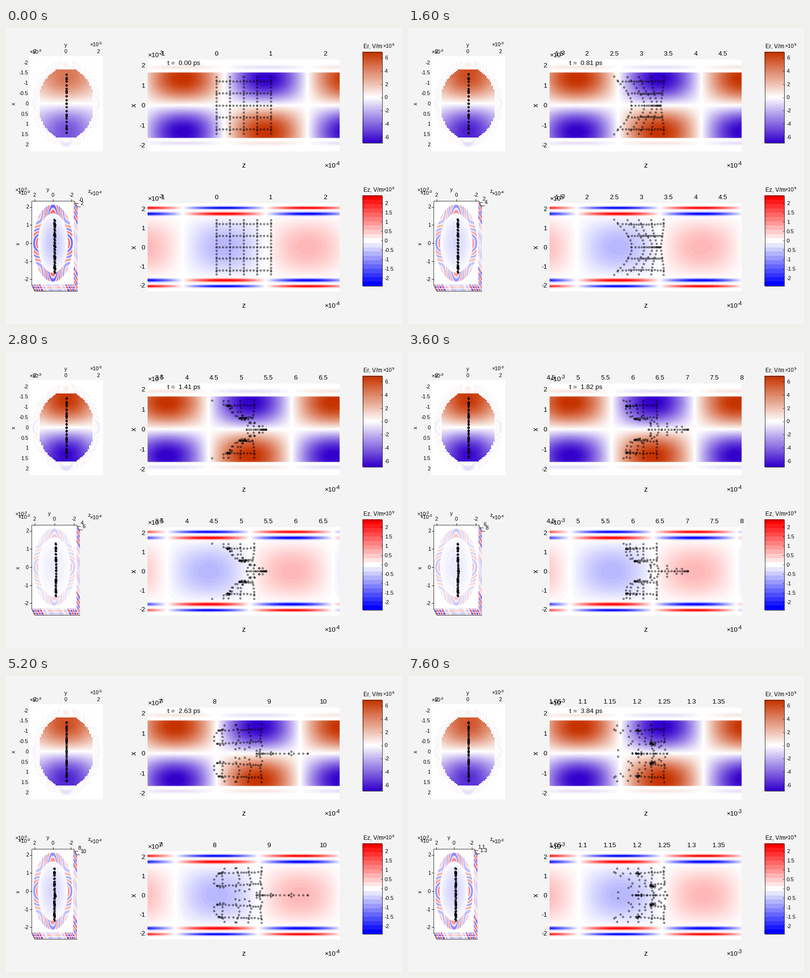
A matplotlib script for the animation above (8000 ms loop, 800 by 600 pixels).

```python
import numpy as np
import matplotlib.pyplot as plt
from matplotlib.animation import FuncAnimation
from matplotlib.colors import LinearSegmentedColormap

FRAMES, INTERVAL = 20, 400
UNIT = 110.1              # pixels per 1e-4 m along z
K = 2 * np.pi / 336       # wave number, 1/px
CREST = 525               # pixel of the field crest at t = 0
SPEED = 66.9              # wave speed, px per frame
LAG = 0.3                 # how much slower the bunch drifts
ACC, GYRO = 5.72, 0.85    # peak acceleration and gyration per frame
LEFT, RIGHT = 286, 674    # z panels
ER_MAX, EZ_MAX = 6.87, 2.41
BIG, SMALL = 13.33, 10.67

plt.rcParams["font.family"] = "Liberation Sans"
er_colors = [(0.2, 0, 0.8), "white", (0.78, 0.2, 0)]
ez_colors = ["blue", "white", "red"]
ER = LinearSegmentedColormap.from_list("er", er_colors, 61)
EZ = LinearSegmentedColormap.from_list("ez", ez_colors, 81)
EZ_BAR = LinearSegmentedColormap.from_list("ez_bar", ez_colors, 21)

fig = plt.figure(figsize=(8, 6), dpi=100, facecolor="#f4f4f4")
ax = fig.add_axes([0, 0, 1, 1])


# ---- particles: electrons in the wave, in the frame moving with it ----

def start_grid():
    col_z, col_x = np.meshgrid(np.linspace(0, 1, 5), np.linspace(-1.43, 1.43, 17))
    row_z, row_x = np.meshgrid(np.linspace(0, 1, 17), np.linspace(-1.2, 1.2, 5))
    z = np.concatenate([col_z.ravel(), row_z.ravel()])
    x = np.concatenate([col_x.ravel(), row_x.ravel()])
    return np.array([424.5 + UNIT * z, x, 0 * z, 0 * z])


def rate(state):
    z, x, uz, ux = state
    phase = K * (z - CREST)
    push = -ACC * np.cos(0.95 * x) * np.sin(phase)
    gyro = -GYRO * np.sin(1.17 * x) * np.cos(phase)
    return np.array([uz - LAG, ux / (10 * UNIT), push - gyro * ux, gyro * uz])


def trace(substeps=12):
    state, h, path = start_grid(), 1 / substeps, []
    for _ in range(FRAMES):
        path.append(state[:2])
        for _ in range(substeps):
            a = rate(state)
            b = rate(state + h / 2 * a)
            c = rate(state + h / 2 * b)
            d = rate(state + h * c)
            state = state + h / 6 * (a + 2 * b + 2 * c + d)
    return path


PATH = trace()


def view_lead(k):
    """Lead of the view over the wave in px (cubic Hermite curve)."""
    t = [0, 4, 7, 11, 13, 16, 19]
    v = [0, 16.4, 32, 22.6, 15, 9.9, 11.9]
    m = [0, 6, 2, -3, -3, -0.5, 1]
    i = min(np.searchsorted(t, k, side="right") - 1, 5)
    h = t[i + 1] - t[i]
    s = (k - t[i]) / h
    return ((1 + 2 * s) * (1 - s) ** 2 * v[i] + s * s * (3 - 2 * s) * v[i + 1]
            + h * s * (1 - s) * ((1 - s) * m[i] - s * m[i + 1]))


# ---- fields ----

def er_profile(x):
    r = np.abs(x)
    edge = np.clip((1.66 - r) / 0.04, 0, 1)
    halo = 0.12 * np.exp(-((r - 1.9) / 0.1) ** 2)
    return -6.9 * np.sign(x) * (np.sin(1.17 * r) * edge + halo)


def wall_rings(r):
    """Two opposite layers of the longitudinal field in the wall."""
    return np.exp(-((r - 1.735) / 0.085) ** 2) - np.exp(-((r - 2.045) / 0.07) ** 2)


def ez_profile(x):
    r = np.abs(x)
    return np.where(r < 1.6, -0.68 * np.cos(0.95 * r), 2.5 * wall_rings(r))


def ripple(x, y):
    """Wall layers that break into slanted fringes off the axes."""
    r, angle = np.hypot(x, y), np.arctan2(y, x)
    skew = np.sin(2 * angle) ** 2
    wave = np.sin(2 * np.pi * (r - 1.6) / 0.6 + 15 * skew)
    return np.where((r > 1.64) & (r < 2.13), wave * (1 - 0.45 * skew), 0)


def er_section(x, y):
    r = np.hypot(x, y) + 1e-9
    ys, xs = np.round(y / 0.1) * 0.1, np.round(x / 0.06) * 0.06
    outline = np.maximum(np.maximum(abs(x), abs(y)), np.hypot(xs, ys) / 1.05)
    inside = -6.9 * np.sin(1.17 * np.minimum(r, 1.5)) * x / r
    cap = -0.8 * np.sign(x) * np.exp(-((r - 1.95) / 0.13) ** 2 - (y / 0.35) ** 2)
    return np.where(outline < 1.65, inside, cap + 0.4 * ripple(x, y) * (r > 1.75))


def ez_section(x, y):
    r = np.hypot(x, y)
    return np.where(r < 1.64, -0.68 * np.cos(0.95 * r), 2 * ripple(x, y))


def side_fringe(u):
    return np.sin(3.6 * u * u + 0.6) * np.where(abs(u) > 1.3, 2.2, 0.7)


# ---- drawing helpers ----

def text(x, y, s, size=SMALL, ha="center", rotation=0):
    """Text whose capitals are centred on y."""
    if rotation:
        ax.text(x, y, s, fontsize=size * 0.72, ha="center", va="center", rotation=rotation)
    else:
        ax.text(x, y + 0.36 * size, s, fontsize=size * 0.72, ha=ha, va="baseline")


def power(x, y, exponent, size=SMALL):
    text(x, y, "×10", size, "left")
    text(x + 1.7 * size, y - 0.32 * size, str(exponent), 0.76 * size, "left")


def line(xs, ys, width=0.8, color="black"):
    ax.plot(xs, ys, color=color, lw=width * 0.72)


def dots(x, y):
    ax.plot(x, y, "o", ms=2.2, mew=0.58, mfc="none", mec="black")


def picture(values, box, cmap, limit):
    left, right, top, bottom = box
    ax.imshow(values, extent=(left, right, bottom, top), cmap=cmap, vmin=-limit,
              vmax=limit, aspect="auto", interpolation="nearest")


def pixels(a, b):
    return np.arange(a, b) + 0.5


def colorbar(top, bottom, cmap, limit, title, ticks, scale, title_y):
    picture(np.linspace(limit, -limit, 183)[:, None], (720, 760, top, bottom), cmap, limit)
    line([720.5, 759.5, 759.5, 720.5, 720.5],
         [top + 0.5, top + 0.5, bottom - 0.5, bottom - 0.5, top + 0.5], 1, "0.2")
    middle = (top + bottom) / 2
    for t in ticks:
        y = middle - scale * t
        line([757, 760], [y, y], 0.6)
        text(765, y, f"{t:g}", 11, "left")
    text(722, title_y, title, 11.6, "left")
    power(761, title_y, 9)


def z_panel(top, bottom, middle, scale, field, cmap, limit, ticks, origin, exponent):
    x = (middle - pixels(top, bottom)) / scale
    picture(field(x, pixels(LEFT, RIGHT)), (LEFT, RIGHT, top, bottom), cmap, limit)
    for t in range(-2, 3):
        text(281, middle - scale * t, str(t), BIG, "right")
    for t in ticks:
        text(origin + UNIT * t, top - 13, tick_name(t, exponent), BIG)
    power(286, top - 9.5, -3, BIG)
    text(480, bottom + 27.5, "z", 14.67)
    power(643, bottom + 28.5, exponent, BIG)
    text(259, middle, "x", 14.67, rotation=90)


def tick_name(t, exponent):
    return f"{round(t * (0.1 if exponent == -3 else 1), 3):g}"


def section_panel(strength, x):
    xs = (pixels(57, 250) - 153) / 41.6
    ys = (pixels(47, 196) - 121.5) / 32.4
    values = er_section(xs[:, None], ys[None, :]) * strength
    picture(values, (47, 196, 57, 250), ER, ER_MAX)
    for t in np.arange(-2, 2.1, 0.5):
        text(45, 153 + 41.6 * t, f"{t:g}", ha="right")
    for px, t in ((57, "-2"), (121, "0"), (186, "2")):
        text(px, 47, t)
    text(121, 34.5, "y")
    text(16, 153, "x", rotation=90)
    power(47, 48, -3)
    power(169, 33, -3)
    dots(np.full_like(x, 121.5), 153 + 41.6 * x)


def box_panel(lead, z, x, lo, hi, exponent):
    first = 2 * np.ceil(lo / 2)
    marks = (first, first + 2) if first + 2 <= hi else (first - 1, first + 1)
    names = [tick_name(t, exponent) for t in marks]
    right = {1: 143, 2: 137}.get(max(map(len, names)), 134)
    if lo <= 0:
        right = 138
    left, top, bottom, dx, dy = 52, 351, 521, 6, 12
    centre, scale = (left + right) / 2, (right - left) / 4.6

    xs = (436 - pixels(top, bottom)) / 36.7
    ys = (pixels(left, right) - centre) / scale
    strength = np.cos(K * (480 + lead - CREST + 84))
    picture(ez_section(xs[:, None], ys[None, :]) * strength,
            (left, right, top, bottom), EZ, EZ_MAX)

    # side and bottom faces of the sheared box
    depth, u = np.meshgrid(np.linspace(0, 1, 13), np.linspace(-2.3, 2.3, 91))
    wave = np.cos(K * (LEFT + 388 * depth + lead - CREST + 84))
    faces = ((right + dx * depth, 436 + 36.9 * u + dy * depth),
             (centre + scale * u + dx * depth, bottom + dy * depth))
    for px, py in faces:
        ax.pcolormesh(px, py, side_fringe(u) * wave, cmap=EZ, vmin=-EZ_MAX,
                      vmax=EZ_MAX, shading="gouraud")
    line([left + dx, left, left, right, right + dx],
         [bottom + dy, bottom, top, top, top + dy])
    line([left + dx, right + dx], [bottom + dy] * 2)

    for t in range(-2, 3):
        y = 436 - 36.7 * t
        line([left - 4, left], [y, y])
        text(46, y, str(t), ha="right")
    for t in (2, 0, -2):
        px = centre - scale * t
        line([px, px], [top - 4, top])
        text(px, 338, str(t))
    for t, name in zip(marks, names):
        d = (t - lo) / (hi - lo)
        line([right + dx * d, right + dx * d + 6], [top + dy * d] * 2)
        text(right + 6.5 + 7 * d, 344 + 12.5 * d, name, ha="left")
    text(centre - 10, 327, "y")
    text(168, 330, "z")
    text(25, 437, "x", rotation=90)
    power(18, 328, -3)
    power(24, 334, -3)
    power(169, 335, exponent)
    d = (z - lead - LEFT) / 388
    dots(centre + dx * d, 436 - 36.7 * x + dy * d)


def draw(k):
    ax.clear()
    z, x = PATH[k]
    lead = view_lead(k)
    origin = 425 - SPEED * k - lead
    lo, hi = (LEFT - origin) / UNIT, (RIGHT - origin) / UNIT
    step = 1 if lo <= 0 <= hi or lo <= 10 <= hi else 0.5
    ticks = np.arange(np.ceil(lo / step), np.floor(hi / step) + 1) * step
    exponent = -3 if ticks[-1] > 10.9 else -4

    def er(xs, px):
        return er_profile(xs)[:, None] * np.cos(K * (px + lead - CREST))

    def ez(xs, px):
        return ez_profile(xs)[:, None] * np.cos(K * (px + lead - CREST + 84))

    z_panel(64, 250, 156.5, 40.5, er, ER, ER_MAX, ticks, origin, exponent)
    z_panel(355, 534, 444, 38.8, ez, EZ, EZ_MAX, ticks, origin, exponent)
    dots(z - lead, 156.5 - 40.5 * x)
    dots(z - lead, 444 - 38.8 * x)
    text(326, 70.5, f"t =  {k * 20 / 99:.2f} ps", BIG, "left")

    section_panel(np.cos(K * (480 + lead - CREST)), x)
    box_panel(lead, z, x, lo, hi, exponent)
    colorbar(48, 233, ER, ER_MAX, "Er, V/m", range(-6, 7, 2), 13.45, 36)
    colorbar(339, 523, EZ_BAR, EZ_MAX, "Ez, V/m", np.arange(-2, 2.1, 0.5), 38, 327)

    ax.set(xlim=(0, 800), ylim=(600, 0))
    ax.axis("off")
    return []


anim = FuncAnimation(fig, draw, frames=FRAMES, interval=INTERVAL,
                     init_func=lambda: draw(0), repeat=True, repeat_delay=0)
plt.show()
```
